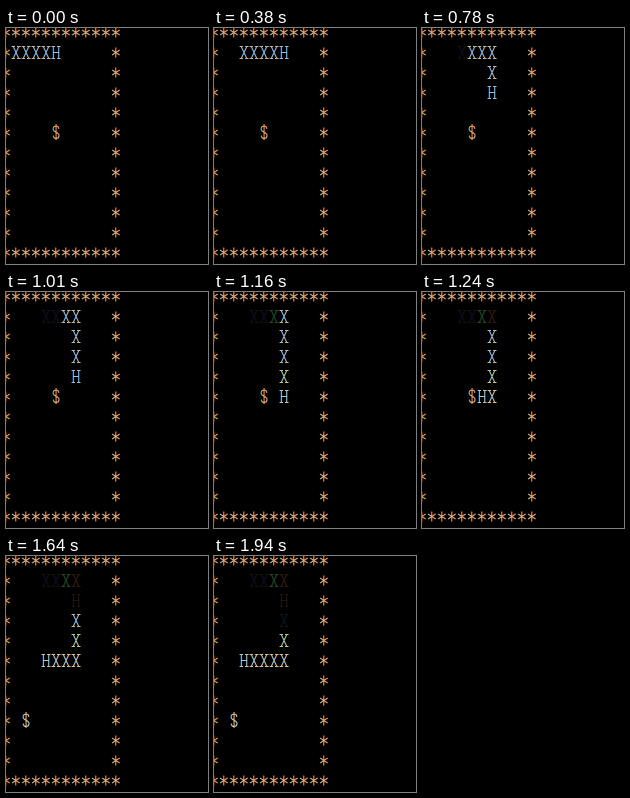
Recreate the animation shown at these times as an HTML page with a canvas. Size 202x236 px, loop 2190 ms.

```html
<!DOCTYPE html>
<html lang="en">
<head>
<meta charset="utf-8">
<title>Terminal snake</title>
<style>
html, body { margin: 0; width: 100%; height: 100%; overflow: hidden; background: #000; }
canvas { display: block; }
</style>
</head>
<body>
<canvas width="202" height="236"></canvas>
<script>
const ctx = document.querySelector('canvas').getContext('2d');
const LOOP = 2190;
const times = [0, 380, 530, 780, 1010, 1160, 1240, 1390, 1640, 1940];
const EAT = 7; // step at which the snake reaches the food

// Thin serif terminal glyphs in a 10 x 20 cell
const glyphs = {
  X: new Path2D('M.5-1.5H4M6-1.5H9.5M.5 10.5H4M6 10.5H9.5M2.2-1.5L7.8 10.5M7.8-1.5L2.2 10.5'),
  H: new Path2D('M.5-1.5H4M6-1.5H9.5M.5 10.5H4M6 10.5H9.5M2.3-1.5V10.5M7.7-1.5V10.5M2.3 4.5H7.7'),
  $: new Path2D('M5-4V12M7.8 1C8-3 2-3 2 1C2 5 8 3.5 8 7.5C8 11.5 2 11.5 2.2 7.5'),
  '*': new Path2D('M4.7-.5V9.5M1 2L8.6 7M8.6 2L1 7')
};
const cool = [168, 188, 202];
const warm = [196, 198, 180];
const green = [170, 204, 164];
const tan = [212, 170, 122];

// Faint remains of erased cells, by position along the route
const traces = {
  3: [15, 17, 22], 4: [13, 17, 28], 5: [28, 76, 32],
  6: [48, 26, 12], 7: [36, 18, 14], 8: [14, 21, 28]
};

const route = [];
for (let x = 1; x <= 7; x++) route.push([x, 1]);
for (let y = 2; y <= 5; y++) route.push([7, y]);
for (let x = 6; x >= 3; x--) route.push([x, 5]);

// Each colour channel is shifted a little, as on an LCD
function put(char, [col, row], color) {
  color.forEach((value, i) => {
    const rgb = [0, 0, 0];
    rgb[i] = value;
    ctx.strokeStyle = `rgb(${rgb})`;
    ctx.setTransform(1, 0, 0, 1, col * 10 - 5 + (1 - i) / 4, row * 20);
    ctx.stroke(glyphs[char]);
  });
}

function draw(t) {
  const step = times.findLastIndex(start => t >= start);
  const head = step ? step + 5 : 4;
  const tail = head - (step < EAT ? 4 : 5);

  ctx.setTransform(1, 0, 0, 1, 0, 0);
  ctx.globalCompositeOperation = 'source-over';
  ctx.fillStyle = '#000';
  ctx.fillRect(0, 0, 202, 236);
  ctx.globalCompositeOperation = 'lighter';
  ctx.lineWidth = 1.05;

  for (let i = 0; i < 12; i++) {
    put('*', [i, 0], tan);
    put('*', [i, 11], tan);
    if (i > 0 && i < 11) {
      put('*', [0, i], tan);
      put('*', [11, i], tan);
    }
  }
  if (step < EAT) put('$', [5, 5], tan);
  else put('$', [2, 8], warm);

  for (let i = 3; i < tail; i++) put(i === 7 ? 'H' : 'X', route[i], traces[i]);
  for (let i = tail; i <= head; i++) {
    const color = i === 9 && head > 9 ? green : i > 9 ? warm : cool;
    put(i === head ? 'H' : 'X', route[i], color);
  }
}

let begin;
function tick(now) {
  begin ??= now;
  draw((now - begin) % LOOP);
  requestAnimationFrame(tick);
}
draw(0);
requestAnimationFrame(tick);
</script>
</body>
</html>
```
